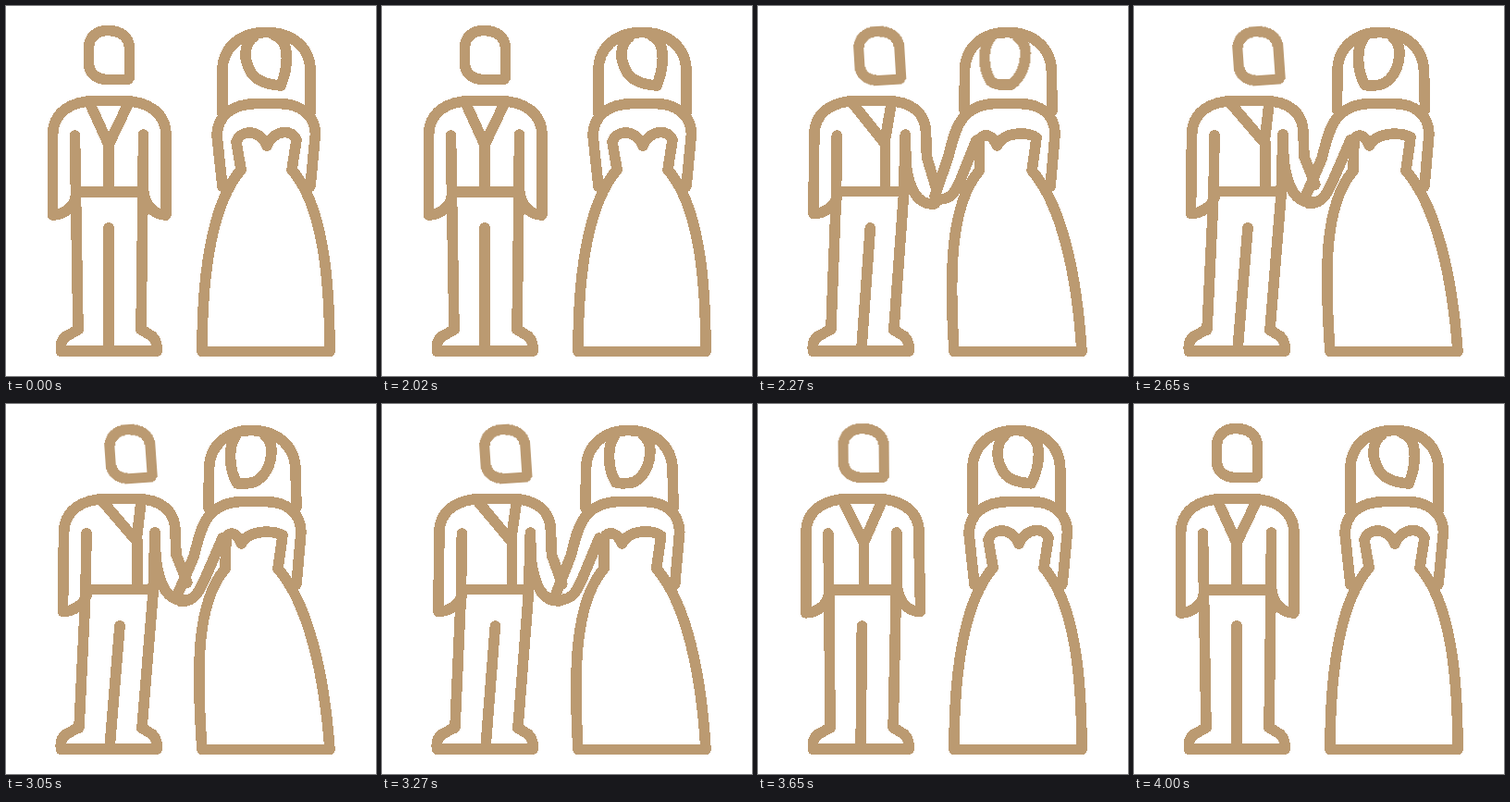
Recreate the animation shown at these times as an HTML page. Size 400x400 px, loop 4.02 s.

```html
<!DOCTYPE html>
<html lang="en">
<head>
<meta charset="utf-8">
<title>Couple</title>
<style>
  html, body { margin: 0; width: 100%; height: 100%; overflow: hidden; background: #fff; }
  svg { display: block; width: 100vw; height: 100vh; }
  path {
    d: var(--a);
    fill: none;
    stroke: #bb9a71;
    stroke-width: 11.6;
    stroke-linecap: round;
    stroke-linejoin: round;
    shape-rendering: crispEdges;
  }
  path, .face { animation: 4020ms linear infinite; }

  /* --a: standing apart, --b: holding hands */
  .groom path { animation-name: groom; }
  .bride path { animation-name: bride; }
  .groom .head { animation-name: tilt; transform-origin: 111.5px 53px; }
  .bride .veil { animation-name: veil; }
  .bride .arm { animation-name: arm; }
  .face { animation-name: face; }
  .still { animation: none !important; }

  @keyframes groom {
    0% { d: var(--a); }
    50.25% { d: var(--a); animation-timing-function: cubic-bezier(.3, 0, .04, 1); }
    62.69% { d: var(--b); }
    77.11% { d: var(--b); animation-timing-function: cubic-bezier(.59, 0, .15, 1); }
    99.5%, 100% { d: var(--a); }
  }
  @keyframes tilt {
    0% { transform: translate(0, 0) rotate(0deg); }
    50.25% { transform: translate(0, 0) rotate(0deg); animation-timing-function: cubic-bezier(.3, 0, .04, 1); }
    62.69% { transform: translate(23px, 1px) rotate(-4deg); }
    77.11% { transform: translate(23px, 1px) rotate(-4deg); animation-timing-function: cubic-bezier(.59, 0, .15, 1); }
    99.5%, 100% { transform: translate(0, 0) rotate(0deg); }
  }
  @keyframes bride {
    0% { d: var(--a); }
    50.25% { d: var(--a); animation-timing-function: cubic-bezier(.3, 0, .04, 1); }
    62.69% { d: var(--b); }
    77.11% { d: var(--b); animation-timing-function: cubic-bezier(.65, 0, .19, 1); }
    90.05%, 100% { d: var(--a); }
  }
  @keyframes face {
    0% { transform: translateX(0); }
    50.25% { transform: translateX(0); animation-timing-function: cubic-bezier(.3, 0, .04, 1); }
    62.69% { transform: translateX(-17px); }
    77.11% { transform: translateX(-17px); animation-timing-function: cubic-bezier(.65, 0, .19, 1); }
    90.05%, 100% { transform: translateX(0); }
  }
  @keyframes arm {
    0% { d: var(--a); }
    50.25% { d: var(--a); animation-timing-function: cubic-bezier(.2, 0, .02, 1); }
    62.69% { d: var(--b); }
    77.11% { d: var(--b); animation-timing-function: cubic-bezier(1, 0, .3, 1); }
    90.05%, 100% { d: var(--a); }
  }
  @keyframes veil {
    0% { d: var(--a); }
    50.25% { d: var(--a); animation-timing-function: cubic-bezier(.16, .9, .4, 1); }
    76.37% { d: var(--b); }
    77.11% { d: var(--b); animation-timing-function: cubic-bezier(.5, 0, .25, 1); }
    99.5%, 100% { d: var(--a); }
  }
</style>
</head>
<body>
<svg viewBox="0 0 400 400">
  <g class="groom">
    <path class="head" style="--a:path('M89.5 62 L89.5 45 C89.5 34 98 26.5 110 26.5 C124 26.5 133.5 34 133.5 46 L133.5 76 Q133.5 79.5 130 79.5 L110 79.5 C98 79.5 89.5 73 89.5 62 Z')"/>
    <!-- left sleeve, shoulders, right sleeve -->
    <path style="
      --a:path('M75 207 C73 218 62 226 50.5 226 L50.5 140 C50.5 115 70 102.5 98 102.5 L125 102.5 C153 102.5 173 115 173 140 L173 165 L173 226');
      --b:path('M87 207 C84 217 73 224 61.5 224.5 L62.5 140 C62.5 115 82 102.5 110 102.5 L140 102.5 C167 102.5 183 115 183 138 L184 163 L196 193')"/>
    <!-- right hand -->
    <path style="
      --a:path('M148.5 139 L148.5 200 C151 216 160 226 173 226');
      --b:path('M161 139 L162 168 C166 195 174 214 194 212')"/>
    <!-- sides -->
    <path style="
      --a:path('M74.5 140 L75.5 205 L78 350');
      --b:path('M87 140 L86 205 L79 350')"/>
    <path style="
      --a:path('M148.5 139 L148 205 L146 350');
      --b:path('M161 139 L159 205 L147 350')"/>
    <!-- lapels, belt, trousers -->
    <path style="
      --a:path('M91 106 L111 150 L132 106 M111 150 L111 200 M77 201 L148 201 M111 240 L111 372');
      --b:path('M105 106 L141 148 L146 106 M142 148 L142 199 M88 200.5 L159 200.5 M123 240 L112 372')"/>
    <path class="still" style="--a:path('M78 350 L65 357 Q58 362 59.5 373 L163 373 Q164 363 158 357 L146.5 350')"/>
  </g>

  <g class="bride">
    <path class="veil" style="
      --a:path('M234 116 L234 70 C234 45 253 28.5 281 28.5 C310 28.5 329 45 329 70 L329 116');
      --b:path('M219 112 L219.5 70 C220 45 239 28.5 265 28.5 C293 28.5 312 45 313 70 L314 112')"/>
    <g class="face">
      <path class="veil" style="
        --a:path('M268 33 C257 41 257 57 263 68 C268 81 283 85 297 86 C302 74 304 60 303 50 C302 41 298 35 291 32');
        --b:path('M265 35 C257 47 258 71 267 86 C271 86.5 279 86 285 84.5 C298 79 304 64 304 50 C304 42 300 37 297 34')"/>
    </g>
    <!-- right shoulder -->
    <path style="
      --a:path('M270 105.5 L295 105.5 C318 105.5 334 118 334.5 138 L329 195');
      --b:path('M254 105.5 L279 105.5 C305 105.5 318 118 319 138 L314 195')"/>
    <!-- left arm -->
    <path class="arm" style="
      --a:path('M234 195 L228 140 C229 118 245 105.5 272 105.5');
      --b:path('M185 207 L203 165 C210 140 213 106 256 105.5')"/>
    <path class="arm" style="
      --a:path('M249 147 L252 165 C253 170 254 174 254 177');
      --b:path('M234 145 L215 189 C209 203 203 214 189 213.5')"/>
    <!-- bodice and skirt -->
    <path style="
      --a:path('M254 177 L249 147 C254 133 274 133 282 151 C290 133 310 133 314 145 L309 177');
      --b:path('M237 178 L238 144 C243 137 250 140 254.5 151 C262 136 288 136 299 142 L294 178')"/>
    <path style="
      --a:path('M254 177 C222 215 212 290 212 373.5 L350 373.5 C350 292 342 215 309 177');
      --b:path('M237 178 C205 215 206 290 212 373.5 L350 373.5 C344 290 326 215 294 178')"/>
  </g>
</svg>
</body>
</html>
```
